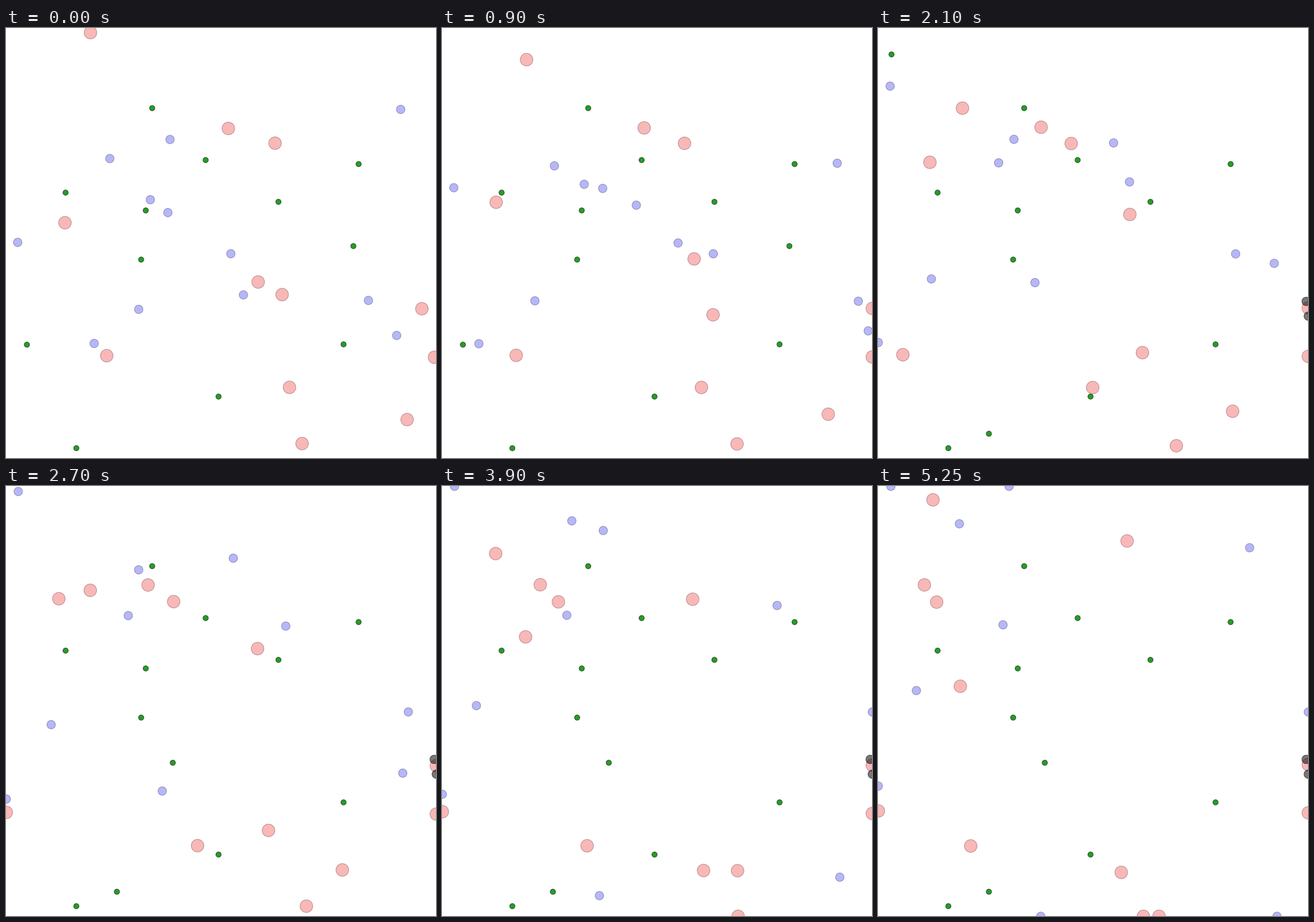
These frames come from a looping animation (700 px wide and 700 px high, 5.4 s). A matplotlib script:

```python
import numpy as np
import matplotlib.pyplot as plt
from matplotlib.animation import FuncAnimation
from matplotlib.patches import Circle

SIZE, DPI = 700, 100
FRAMES, STEP_MS = 36, 150

# face, edge, radius, layer
RED = ((0.91, 0.08, 0.08, 0.3), (0.3, 0, 0, 0.34), 10.3, 1)
BLUE = ((0.07, 0.07, 0.9, 0.3), (0, 0, 0.3, 0.34), 6.9, 2)
GREEN = ((0, 0.56, 0, 0.86), (0, 0, 0, 0.6), 4.3, 3)
DEAD = ((0, 0, 0, 0.53), (0, 0, 0, 0.62))

# Frames of the waypoints, by how many a path has
STOPS = {2: (0, 35), 3: (0, 14, 35), 4: (0, 9, 18, 35), 5: (0, 9, 18, 26, 35)}

fig = plt.figure(figsize=(SIZE / DPI, SIZE / DPI), dpi=DPI, facecolor="white")
ax = fig.add_axes([0, 0, 1, 1])
ax.set(xlim=(-0.5, SIZE - 0.5), ylim=(SIZE - 0.5, -0.5))
ax.axis("off")


def disc(kind, x=0, y=0):
    face, edge, radius, layer = kind
    return ax.add_patch(Circle((x, y), radius, facecolor=face, edgecolor=edge,
                               linewidth=72 / DPI, zorder=layer))


def travel(n):
    """Distance covered at top speed 1 while picking up speed."""
    n = np.asarray(n, float)
    return n - 2.2 * (1 - np.exp(-n / 3.2))


def glide(points):
    """Smooth course through the waypoints, stopped by the walls."""
    p = np.array(points, float)
    t = travel(STOPS[len(p)])
    now = travel(np.arange(FRAMES))
    slope = np.gradient(p, t, axis=0, edge_order=min(2, len(p) - 1))
    i = np.clip(np.searchsorted(t, now, side="right") - 1, 0, len(t) - 2)
    h = (t[i + 1] - t[i])[:, None]
    u = (now - t[i])[:, None] / h
    course = ((1 + 2 * u) * (1 - u) ** 2 * p[i]
              + u * (1 - u) ** 2 * h * slope[i]
              + u ** 2 * (3 - 2 * u) * p[i + 1]
              - u ** 2 * (1 - u) * h * slope[i + 1])
    return course.clip(0, SIZE)


movers = []


def roam(kind, *points, dies=FRAMES):
    movers.append((disc(kind), kind, glide(points), dies))


roam(RED, (137, 7), (137, 130), (133.5, 325.5))
roam(RED, (361.5, 163), (265, 161), (75, 160.5))
roam(RED, (437.5, 187), (95, 188.5))
roam(RED, (95.5, 316.5), (84.5, 260), (85.5, 183), (89, 22))
roam(RED, (410, 413), (409.5, 303), (405, 89))
roam(RED, (449, 433.5), (430, 528), (431.5, 700))
roam(RED, (461, 584.5), (150.5, 585.5))
roam(RED, (481.5, 676), (480, 677.5), (488.5, 683.5), (457, 735))
roam(RED, (652.5, 637), (610.5, 624.5), (547, 624.5), (395.5, 628.5))
roam(RED, (163.5, 533), (-179, 528.5))
roam(RED, (676.5, 456.5), (995, 453))
roam(RED, (697, 535.5), (995, 531.5))

roam(BLUE, (168.5, 212), (189.5, 227), (198.5, 210.5), (203, 225.5))
roam(BLUE, (266.5, 181), (255, 414), (264.5, 867))
roam(BLUE, (234.5, 279), (228, 232), (215.5, 136), (213, -26))
roam(BLUE, (263, 300), (350.5, 277), (455, 227.5), (545, 194), (604.5, 100))
roam(BLUE, (18.5, 348.5), (20.5, -357))
roam(BLUE, (365.5, 367), (965, 367.5))
roam(BLUE, (386, 434), (381.5, 293), (369.5, 117), (262, 72), (132, 61))
roam(BLUE, (215.5, 457.5), (118, 432.5), (73, 388), (62, 332.5))
roam(BLUE, (143, 513), (-95, 511.5), (-513, 488))
roam(BLUE, (642, 132), (649, 827))
roam(BLUE, (589.5, 443), (1285, 453), dies=7)
roam(BLUE, (635.5, 500), (801, 426), (1095, -104), dies=10)

# Food: x, y and, if it is eaten or regrows, the frames it lies there
FOOD = [(237.5, 130), (324.5, 214.5), (573.5, 221), (96.5, 267.5), (443, 282.5),
        (227, 296.5), (219.5, 376.5), (549, 514.5), (345.5, 599.5), (114, 683.5),
        (33.5, 515, 0, 7), (21.5, 42.5, 7, 16), (271, 450, 16, FRAMES),
        (565, 354.5, 0, 13), (180, 660, 13, FRAMES)]
food = [(disc(GREEN, x, y), span or (0, FRAMES)) for x, y, *span in FOOD]


def draw(n):
    for patch, kind, course, dies in movers:
        dead = n >= dies
        face, edge = DEAD if dead else kind[:2]
        patch.set(center=course[min(n, dies)], facecolor=face, edgecolor=edge,
                  zorder=4 if dead else kind[3])
    for patch, (start, end) in food:
        patch.set_visible(start <= n < end)
    return []


anim = FuncAnimation(fig, draw, frames=FRAMES, interval=STEP_MS, repeat=True)
plt.show()
```
